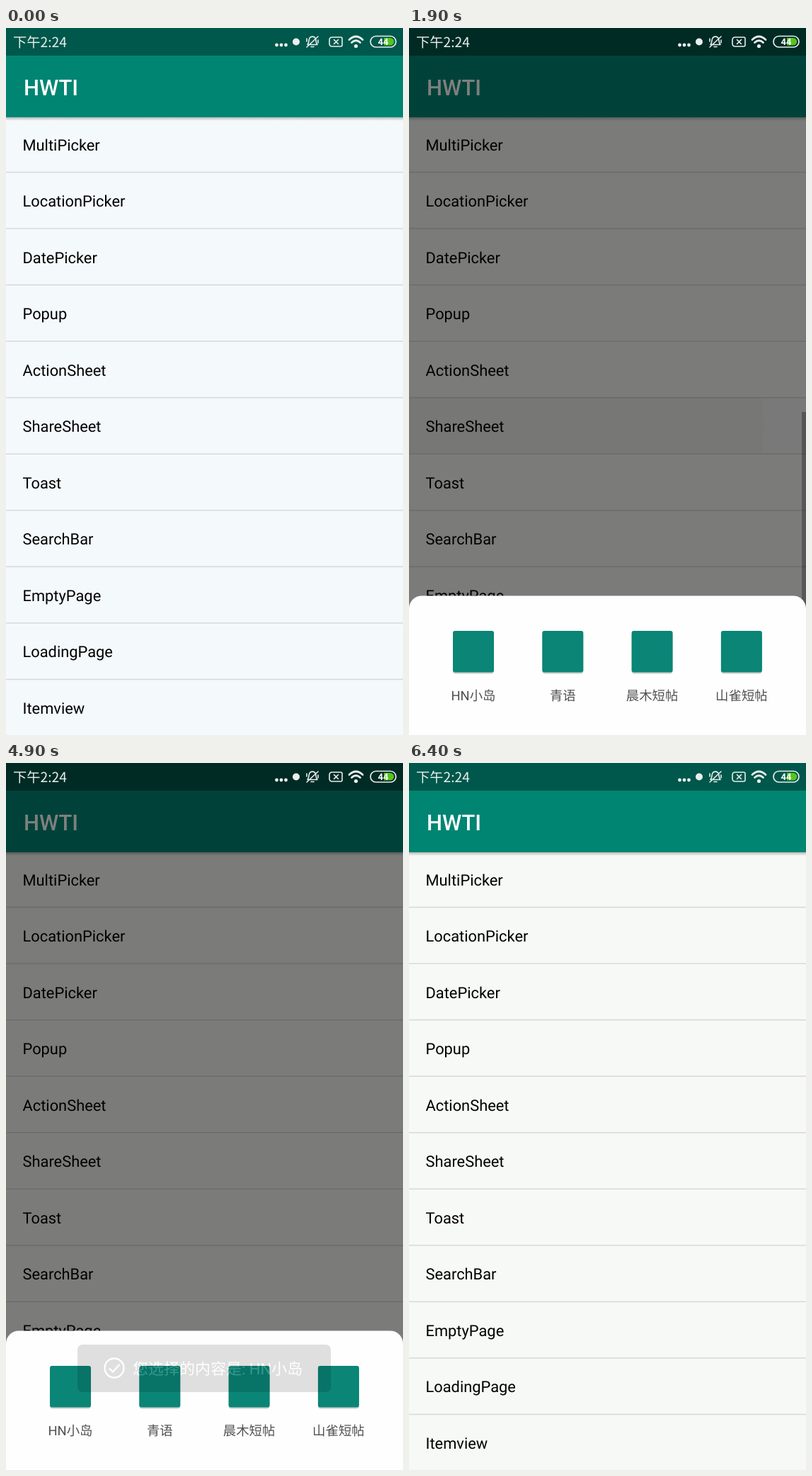
Animation of 561 by 998 pixels, one loop 6.5 s. Source, as an HTML page:

```html
<!DOCTYPE html>
<html lang="zh">
<head>
<meta charset="utf-8">
<style>
  html, body { margin: 0; width: 100%; height: 100%; overflow: hidden; }
  svg {
    display: block; width: 100%; height: 100%;
    font-family: Roboto, "Noto Sans CJK SC", "Noto Sans CJK", sans-serif;
    text-rendering: geometricPrecision;
  }
</style>
</head>
<body>
<svg viewBox="0 0 561 998">
  <defs>
    <linearGradient id="shade" x2="0" y2="1">
      <stop stop-opacity=".26"/>
      <stop offset="1" stop-opacity="0"/>
    </linearGradient>
    <clipPath id="row"><rect y="522" width="561" height="79"/></clipPath>
  </defs>

  <rect id="page" width="561" height="998"/>
  <g id="press" clip-path="url(#row)">
    <rect y="522" width="561" height="79" opacity=".06"/>
    <circle id="ripple" cx="100" cy="562" opacity=".037"/>
  </g>
  <g id="list" font-size="21.85"></g>
  <rect y="126" width="561" height="5" fill="url(#shade)"/>
  <rect width="561" height="39" fill="#00574b"/>
  <rect y="39" width="561" height="87" fill="#008573"/>
  <text x="25" y="95" font-size="31" font-weight="500" fill="#fff">HWTI</text>
  <rect id="bar" x="555" y="542" width="6" height="456"/>
  <rect id="dim" width="561" height="998"/>

  <g fill="#e9efed">
    <text x="10" y="27" font-size="19.3" font-weight="500" font-family="'Noto Sans CJK SC', 'Noto Sans CJK', sans-serif">下午2:24</text>
    <circle cx="382.5" cy="24" r="2.4"/>
    <circle cx="389" cy="24" r="2.4"/>
    <circle cx="395.5" cy="24" r="2.4"/>
    <circle cx="410" cy="19.5" r="5"/>
    <circle cx="494.5" cy="25.5" r="2.6"/>
    <g fill="none" stroke="#e9efed" stroke-width="1.6" stroke-linecap="round" stroke-linejoin="round">
      <path d="M426 23.5H440C437.5 21 438.5 18 437.5 15.5C436 11 430 11 428.5 15.5C427.5 18 428.5 21 426 23.5M431 26.5H435M425 27L441 12M425 15V19M441 17V21"/>
      <path d="M461 13H473Q475 13 475 15V24Q475 26 473 26H461Q457 26 457 22V17Q457 13 461 13M463.5 16.5L469.5 22.5M469.5 16.5L463.5 22.5"/>
      <path d="M485 16.5Q494.5 7.5 504 16.5M488.5 20.5Q494.5 15 500.5 20.5" stroke-width="2.7"/>
      <rect x="515" y="11.5" width="36" height="15.5" rx="7.7" stroke-width="1.7"/>
    </g>
    <path d="M534 14H543A5.2 5.2 0 0 1 543 24.5H534Z" fill="#55c51e"/>
    <text x="533" y="24" font-size="13" font-weight="700" text-anchor="middle" fill="#fff">44</text>
  </g>

  <g id="sheet" font-size="18.4" text-anchor="middle">
    <rect y="801.5" width="561" height="230" rx="18" fill="#fdfefd"/>
  </g>

  <g id="toast">
    <rect x="101" y="821" width="358" height="67" rx="7" fill-opacity=".71"/>
    <g fill="none" stroke="#fff" stroke-width="2.4">
      <circle cx="153" cy="854" r="13.5"/>
      <path d="M146 854.5L151 859.5L160.5 849"/>
    </g>
    <text x="179" y="863" font-size="22" fill="#fff">您选择的内容是: HN小岛</text>
  </g>
</svg>
<script>
const $ = id => document.getElementById(id);
const set = (el, attrs) => {
  for (const k in attrs) el.setAttribute(k, attrs[k]);
  return el;
};
function add(parent, tag, attrs, text = '') {
  const el = set(document.createElementNS('http://www.w3.org/2000/svg', tag), attrs);
  el.textContent = text;
  parent.append(el);
}

const items = ['MultiPicker', 'LocationPicker', 'DatePicker', 'Popup', 'ActionSheet', 'ShareSheet',
  'Toast', 'SearchBar', 'EmptyPage', 'LoadingPage', 'Itemview'];
items.forEach((name, i) => {
  const y = i * 79.55;
  add($('list'), 'text', { x: 23.5, y: 172.5 + y }, name);
  add($('list'), 'rect', { y: 202.8 + y, width: 561, height: 1.5, opacity: .13 });
});

['HN小岛', '青语', '晨木短帖', '山雀短帖'].forEach((name, i) => {
  const x = 91 + i * 126.3;
  add($('sheet'), 'rect', { x: x - 29, y: 853, width: 58, height: 58.5, rx: 4, opacity: .2 });
  add($('sheet'), 'rect', { x: x - 29, y: 851, width: 58, height: 58.5, rx: 3, fill: '#0a8576' });
  add($('sheet'), 'text', { x, y: 948.5, fill: '#505150' }, name);
});

const ramp = (t, from, to) => Math.min(1, Math.max(0, (t - from) / (to - from)));
const ease = p => (1 - Math.cos(Math.PI * p)) / 2;
// Rises over a..b, falls over c..d
const pulse = (t, a, b, c, d) => ramp(t, a, b) - ramp(t, c, d);

function draw() {
  // The screen refreshes ten times a second
  const t = Math.floor(performance.now() % 6500 / 100) * 100;

  set($('page'), { fill: t < 1500 ? '#f4f9fc' : '#f7f9f6' });
  set($('press'), { opacity: pulse(t, 1450, 1500, 1750, 1980) });
  set($('ripple'), { r: Math.max(0, t - 1499) });
  set($('bar'), { opacity: .29 * pulse(t, 1500, 1600, 1900, 2150) });
  set($('dim'), { opacity: .5 * pulse(t, 1640, 1870, 6030, 6320) });

  const shown = ease(ramp(t, 1565, 1765)) - ease(ramp(t, 5930, 6130));
  set($('sheet'), { opacity: shown, transform: `translate(0 ${200 * (1 - shown)})` });
  set($('toast'), { opacity: pulse(t, 3450, 3700, 4650, 4950) });
  requestAnimationFrame(draw);
}
draw();
</script>
</body>
</html>
```
